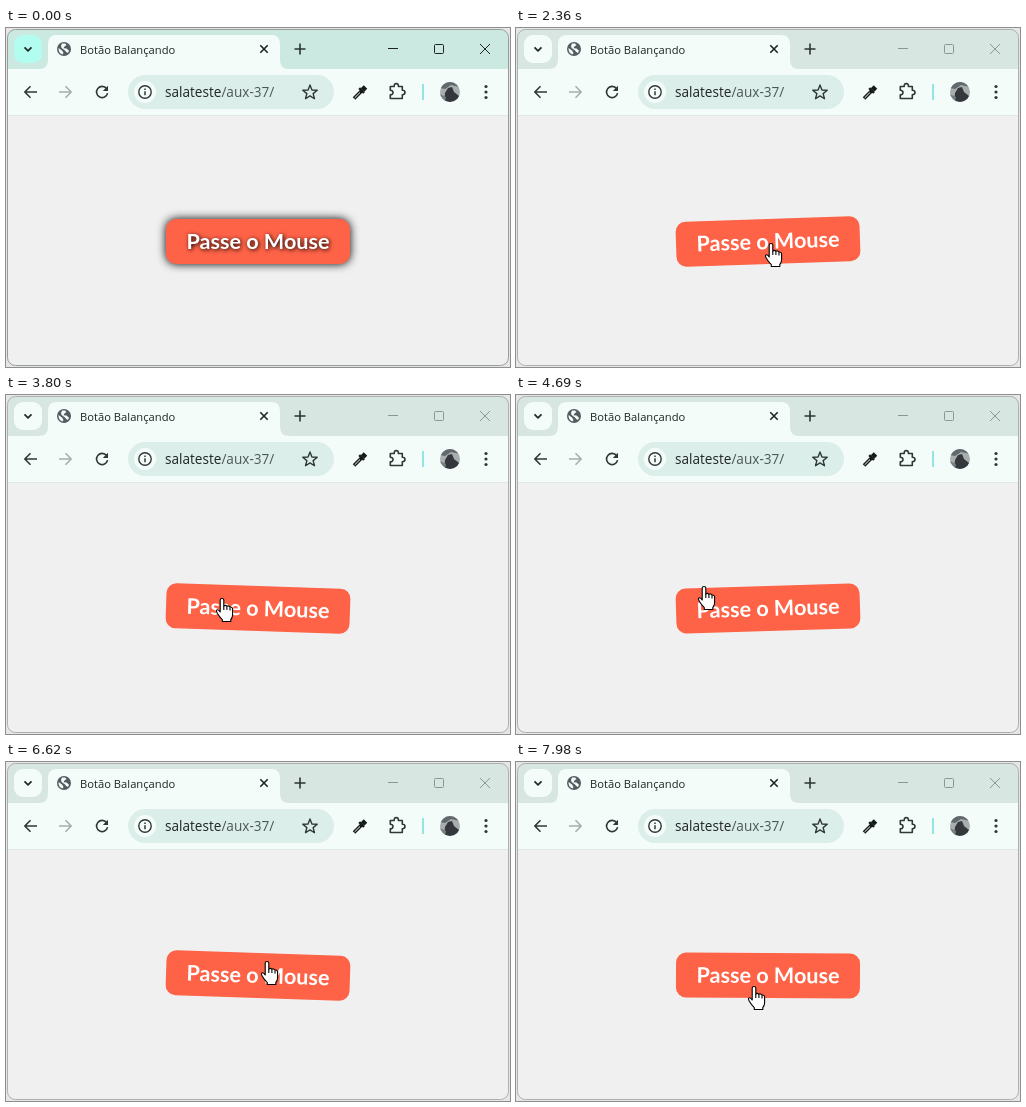
Animation, 504 px wide and 339 px high, one loop 8 s. Source, as an HTML page with a canvas:

```html
<!DOCTYPE html>
<html lang="pt">
<head>
<meta charset="utf-8">
<title>Botão Balançando</title>
<style>
html, body { margin: 0; width: 100%; height: 100%; overflow: hidden; background: #e6e6e6; }
canvas { display: block; width: 504px; height: 339px; }
</style>
</head>
<body>
<canvas id="stage"></canvas>
<script>
const W = 504, H = 339, LOOP = 8000;
const canvas = document.getElementById('stage');
const scale = window.devicePixelRatio || 1;
canvas.width = W * scale;
canvas.height = H * scale;
const ctx = canvas.getContext('2d');

const SWING_PERIOD = 600, SWING_DEGREES = 2;
const HOVERS = [[1885, 5150], [6495, LOOP]];
const BUTTON = { x: 160, y: 191, w: 184, h: 45 };
const INK = '#303836', SURFACE = '#f4fcfa';

// time, x, y of the pointer's hot spot
const POINTER = [
  [1120, 434, 334], [1690, 319, 262], [1890, 282, 232], [2300, 257, 216],
  [2700, 249, 211], [2980, 246, 210], [3600, 224, 206], [4300, 197, 195],
  [4690, 188, 191], [5050, 166, 190], [5210, 155, 184], [5400, 151, 158],
  [5680, 212, 125], [5850, 252, 121], [6050, 269, 163], [6300, 270, 176],
  [6495, 268, 192], [6850, 246, 208], [7290, 236, 216], [7980, 238, 224]
];

const ARROW = new Path2D('M.5 .5V16.5L4.3 13L7 18.8L9.4 17.7L6.8 12H11.7Z');
const HAND = new Path2D('M-1.8 14V2Q-1.8 .5 0 .5T1.8 2V8Q3.2 6.6 4.9 8.4Q6.5 7.2 8 9.2Q9.6 8.5 10.6 10.6' +
  'V17Q10.4 20 8.8 21.5V23.5H.3V21.7Q-2.4 19-4.7 15.2Q-6.3 12.4-4.8 11.8Q-3.3 11.5-1.8 14Z');
const KNUCKLES = new Path2D('M1.8 8V12M4.9 8.8V12M8 9.6V12.5');

function fillRound(x, y, w, h, r, color) {
  ctx.fillStyle = color;
  ctx.beginPath();
  ctx.roundRect(x, y, w, h, r);
  ctx.fill();
}

function disc(x, y, r, color) {
  ctx.fillStyle = color;
  ctx.beginPath();
  ctx.arc(x, y, r, 0, Math.PI * 2);
  ctx.fill();
}

function line(d, color = INK, width = 1.5) {
  ctx.strokeStyle = color;
  ctx.lineWidth = width;
  ctx.stroke(new Path2D(d));
}

function shape(d, color) {
  ctx.fillStyle = color;
  ctx.fill(new Path2D(d));
}

function text(value, x, y, font, color) {
  ctx.font = font;
  ctx.fillStyle = color;
  ctx.fillText(value, x, y);
  return x + ctx.measureText(value).width;
}

function mix(a, b, k) {
  return `rgb(${a.map((v, i) => Math.round(v + (b[i] - v) * k)).join()})`;
}

function drawTabStrip(blur) {
  ctx.fillStyle = mix([203, 232, 225], [215, 230, 225], blur);
  ctx.fillRect(0, 0, W, 42);
  fillRound(8, 7, 28, 28, 9, mix([178, 253, 240], [244, 252, 250], blur));
  line('M18.5 19.3L22 22.8L25.5 19.3', '#1f2927', 1.7);

  shape('M33 41Q42 41 42 32V16Q42 7 51 7H265Q274 7 274 16V32Q274 41 283 41Z', SURFACE);
  disc(58, 21, 7, '#555c60');
  shape('M52.5 20L56 22.5L57.5 25L56.5 26.6Q52.3 25 52.5 20Z' +
    'M56 15.6L59 15.4L60.5 17L58.5 18.5L57.5 20.2L60.5 20.6L63 22.8L62 25Q60 24 59 22.5L55.6 20L55 18Z', SURFACE);
  text('Botão Balançando', 74, 25.5, '11.2px "Open Sans", sans-serif', '#1f2423');
  line('M254.3 17.3L261.7 24.7M261.7 17.3L254.3 24.7', '#1f2423', 1.6);
  line('M288.5 21H299.5M294 15.5V26.5', '#2c3432', 1.6);

  const control = mix([30, 36, 35], [142, 150, 147], blur);
  line('M382 20.5H392', control, 1);
  line('M429.5 16.5H436.5Q437.5 16.5 437.5 17.5V24.5Q437.5 25.5 436.5 25.5H429.5Q428.5 25.5 428.5 24.5V17.5Q428.5 16.5 429.5 16.5Z', control, 1);
  line('M474 16L484 26M484 16L474 26', control, 1);
}

function drawToolbar() {
  ctx.fillStyle = SURFACE;
  ctx.fillRect(0, 41, W, 46);
  line('M31 64H19M24.5 58.3L18.8 64L24.5 69.7', INK, 1.6);
  line('M53 64H65M59.5 58.3L65.2 64L59.5 69.7', '#a4afac', 1.6);
  line('M100.6 60.6A5.6 5.6 0 1 0 101.6 65.2', INK, 1.6);
  shape('M102 57.8V63H96.8Z', INK);

  fillRound(122, 47, 206, 34, 17, '#dbeee9');
  disc(139, 64, 11, SURFACE);
  line('M145.2 64A6.2 6.2 0 1 1 132.8 64A6.2 6.2 0 1 1 145.2 64Z', INK, 1.4);
  line('M139 63.2V67.3M139 60.5V62', INK, 1.5);
  const urlFont = '13.6px "Open Sans", sans-serif';
  const hostEnd = text('salateste', 159, 69, urlFont, '#1f2423');
  text('/aux-37/', hostEnd, 69, urlFont, '#4b5855');

  ctx.beginPath();
  for (let i = 0; i < 10; i++) {
    const a = -Math.PI / 2 + i * Math.PI / 5, r = i % 2 ? 3.3 : 7.6;
    ctx.lineTo(304 + r * Math.cos(a), 64.6 + r * Math.sin(a));
  }
  ctx.closePath();
  ctx.strokeStyle = INK;
  ctx.lineWidth = 1.4;
  ctx.stroke();

  line('M348 70.5L355.5 63', '#151918', 3.6);
  line('M348.6 69.9L354 64.5', SURFACE, 1);
  line('M353.2 60.2L358 65', '#151918', 2.4);
  line('M356.5 62L359.5 59', '#151918', 5);
  line('M384.3 58.5H388.2Q388 55.6 390.3 55.6T392.4 58.5H396.3V62.2Q399 62.2 399 64.4T396.3 66.7V70.5H384.3V66.8Q387 66.8 387 64.5T384.3 62.2Z', INK, 1.6);
  ctx.fillStyle = '#91e6e2';
  ctx.fillRect(416, 56, 2, 16);

  ctx.save();
  ctx.beginPath();
  ctx.arc(444, 64, 10, 0, Math.PI * 2);
  ctx.clip();
  ctx.fillStyle = '#a8adae';
  ctx.fillRect(434, 54, 20, 20);
  shape('M434 54H454V59L445 57L439 61L434 60Z', '#62686c');
  shape('M438 74L439 65L442 60L446 59L448 64L453 68L451 74Z', '#34383d');
  shape('M434 66L440 69L439 74H434Z', '#777e82');
  ctx.restore();

  for (const y of [58.5, 64, 69.5]) disc(480, y, 1.6, INK);
}

function drawButton(swing) {
  const { x, y, w, h } = BUTTON;
  const idle = swing === null;
  ctx.save();
  ctx.translate(x + w / 2, y + h / 2);
  ctx.rotate((swing || 0) * Math.PI / 180);
  if (idle) {
    ctx.shadowColor = '#000';
    ctx.shadowBlur = 10 * scale;
  }
  fillRound(-w / 2, -h / 2, w, h, 10, '#ff6347');
  if (idle) {
    ctx.shadowBlur = 4 * scale;
    ctx.shadowOffsetX = ctx.shadowOffsetY = scale;
  }
  ctx.textAlign = 'center';
  text('Passe o Mouse', 0, 7.5, 'bold 21.6px Lato, sans-serif', '#fff');
  ctx.restore();
}

function drawPage(swing) {
  ctx.fillStyle = '#f0f0f0';
  ctx.fillRect(0, 87, W, H - 87);
  ctx.fillStyle = '#dfe8e5';
  ctx.fillRect(0, 87, W, 1);
  drawButton(swing);
}

function slope(i, axis) {
  const a = POINTER[Math.max(i - 1, 0)], b = POINTER[Math.min(i + 1, POINTER.length - 1)];
  return (b[axis] - a[axis]) / (b[0] - a[0]);
}

// Cubic Hermite curve through the pointer stops
function pointerAt(t) {
  const last = POINTER.length - 1;
  if (t >= POINTER[last][0]) return POINTER[last].slice(1);
  const i = POINTER.findIndex((p, n) => n < last && t < POINTER[n + 1][0]);
  const a = POINTER[i], b = POINTER[i + 1], span = b[0] - a[0];
  const u = (t - a[0]) / span, v = 1 - u;
  return [1, 2].map(axis =>
    a[axis] * (1 + 2 * u) * v * v + slope(i, axis) * span * u * v * v +
    b[axis] * u * u * (3 - 2 * u) - slope(i + 1, axis) * span * u * u * v);
}

function drawPointer(t, hovering) {
  if (t < POINTER[0][0]) return;
  const [x, y] = pointerAt(t);
  const path = hovering ? HAND : ARROW;
  ctx.save();
  ctx.translate(Math.round(x), Math.round(y));
  ctx.fillStyle = '#fff';
  ctx.strokeStyle = '#000';
  ctx.lineWidth = 1.1;
  ctx.fill(path);
  ctx.stroke(path);
  if (hovering) ctx.stroke(KNUCKLES);
  ctx.restore();
}

function draw(t) {
  const hover = HOVERS.find(([from, to]) => t >= from && t < to);
  const swing = hover ? SWING_DEGREES * Math.sin((t - hover[0]) / SWING_PERIOD * Math.PI * 2) : null;
  const blur = t < 200 ? 0 : t < 250 ? 0.5 : 1;

  ctx.setTransform(scale, 0, 0, scale, 0, 0);
  ctx.lineJoin = 'round';
  ctx.fillStyle = '#e6e6e6';
  ctx.fillRect(0, 0, W, H);
  ctx.save();
  ctx.beginPath();
  ctx.roundRect(1.5, 1.5, 501, 336, 8);
  ctx.clip();
  drawTabStrip(blur);
  drawToolbar();
  drawPage(swing);
  ctx.restore();

  ctx.beginPath();
  ctx.roundRect(1.5, 1.5, 501, 336, 8);
  ctx.strokeStyle = mix([150, 158, 156], [172, 176, 175], blur);
  ctx.lineWidth = 1;
  ctx.stroke();
  drawPointer(t, Boolean(hover));
}

const start = performance.now();
function tick() {
  draw((performance.now() - start) % LOOP);
  requestAnimationFrame(tick);
}
tick();
</script>
</body>
</html>
```
